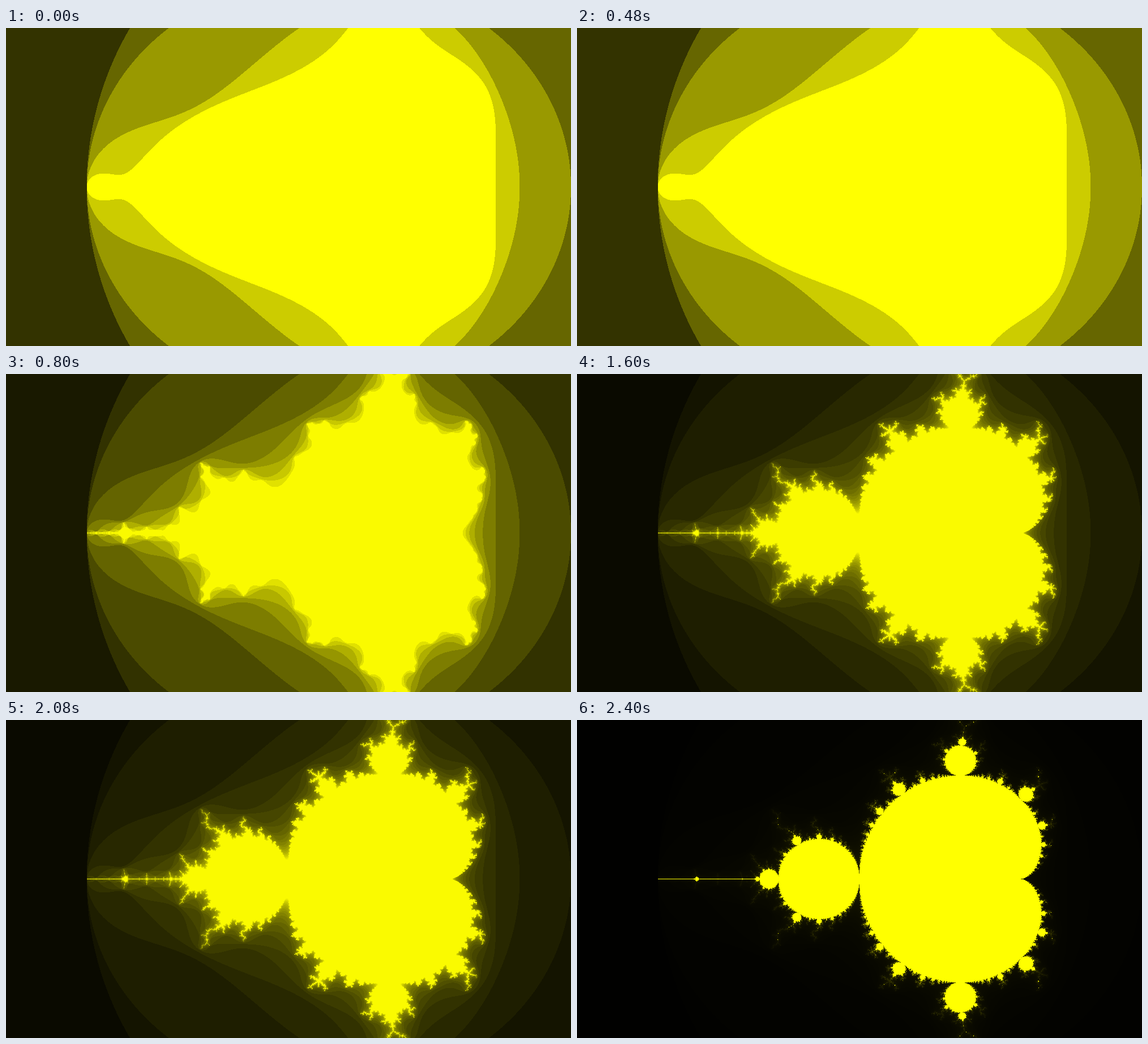
Write an HTML page with a canvas that moves like this. It is 998 px wide and 561 px high and loops after 3.2 s.

```html
<!DOCTYPE html>
<html lang="en">
<head>
<meta charset="utf-8">
<title>Mandelbrot depth</title>
<style>
  html, body { margin: 0; width: 100%; height: 100%; overflow: hidden; background: #000; }
  canvas { display: block; }
</style>
</head>
<body>
<canvas id="stage" width="998" height="561"></canvas>
<script>
const W = 998, H = 561, HOLD = 800;
const LIMITS = [5, 10, 25, 255];
const DEEPEST = LIMITS[LIMITS.length - 1];
const ctx = document.getElementById("stage").getContext("2d");

// Points in the main cardioid or the period-2 disc never escape.
function neverEscapes(cx, cy) {
  const y2 = cy * cy, dx = cx - 0.25, q = dx * dx + y2;
  return q * (q + dx) < y2 / 4 || (cx + 1) ** 2 + y2 < 1 / 16;
}

function escapeCount(cx, cy) {
  if (neverEscapes(cx, cy)) return DEEPEST;
  let x = 0, y = 0, n = 0;
  while (n < DEEPEST && x * x + y * y <= 4) {
    const next = x * x - y * y + cx;
    y = 2 * x * y + cy;
    x = next;
    n++;
  }
  return n;
}

const counts = new Uint8Array(W * H);
for (let py = 0, i = 0; py < H; py++) {
  const cy = (py + 0.5) / H * 2 - 1;
  for (let px = 0; px < W; px++) {
    counts[i++] = escapeCount((px + 0.5) / W * 3.5 - 2.5, cy);
  }
}

const pictures = LIMITS.map(limit => {
  const image = ctx.createImageData(W, H);
  const step = Math.floor(255 / limit);
  counts.forEach((n, i) => {
    const level = Math.min(n, limit) * step;
    image.data.set([level, level, 0, 255], i * 4);
  });
  return image;
});

let shown = -1;
const start = performance.now();

function draw(now) {
  const index = Math.floor(Math.max(0, now - start) / HOLD) % LIMITS.length;
  if (index !== shown) {
    ctx.putImageData(pictures[index], 0, 0);
    shown = index;
  }
  requestAnimationFrame(draw);
}
draw(start);
</script>
</body>
</html>
```
